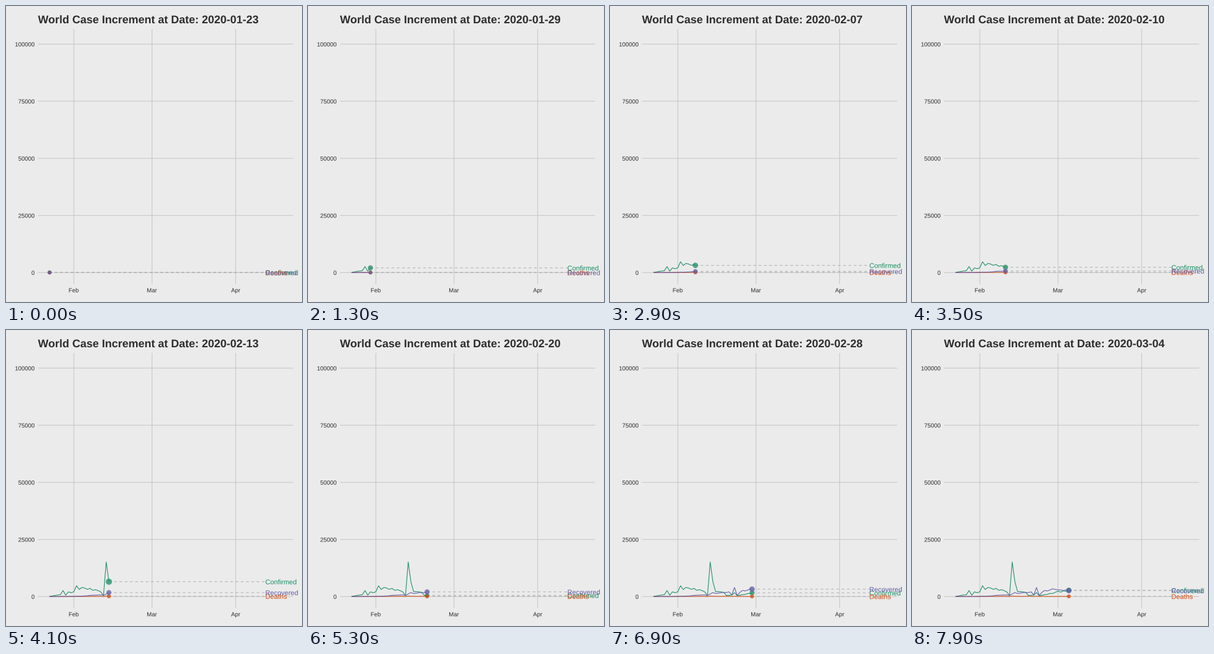
Recreate the animation shown at these times as a matplotlib script. Size 480 by 480 pixels, loop 8000 ms.

```python
import matplotlib.pyplot as plt
import numpy as np
from matplotlib.animation import FuncAnimation
from matplotlib.patches import Circle, PathPatch
from matplotlib.textpath import TextPath
from matplotlib.transforms import Affine2D

SIZE, DPI = 480, 100
PX = 72 / DPI
FRAMES, INTERVAL = 80, 100
START = np.datetime64("2020-01-23")
SPAN, STEPS = 86, 162  # days and steps of the complete reveal
LEFT, RIGHT, TOP, BOTTOM = 51.83, 465.6, 37.3, 451.1
BG, GRID, INK, DASH = "#ebebeb", "#c7c7c7", "#2d2d2d", "#b2b2b2"
LINE = 1.07 * PX

# Daily new cases: name -> (colour, values)
SERIES = {
    "Confirmed": ("#1b8e65", [
        98, 287, 493, 684, 809, 2651, 589, 2068, 1692, 2111, 4749, 3094, 4011, 3743,
        3159, 3597, 2731, 3030, 2612, 2040, 419, 15153, 6517, 2145, 2183, 2034, 1878,
        503, 558, 622, 1753, 386, 607, 846, 982, 1361, 1366, 1900, 2359, 1940, 2534,
        2280, 2766]),
    "Deaths": ("#d04c14", [
        1, 8, 16, 14, 26, 49, 2, 38, 42, 46, 103, 64, 66, 72, 70, 85, 87, 100, 107,
        100, 5, 253, 152, 143, 104, 98, 139, 115, 125, 4, 207, 11, 160, 79, 62, 44,
        58, 69, 55, 89, 75, 94, 94]),
    "Recovered": ("#625ca6", [
        2, 6, 3, 13, 9, 46, 19, 17, 79, 62, 188, 151, 229, 272, 363, 524, 605, 628,
        702, 737, 467, 1145, 1763, 1337, 1470, 1718, 1769, 1769, 2056, 713, 3996,
        508, 1833, 2678, 2479, 2893, 3434, 3071, 2934, 2886, 2626, 2942, 2626]),
}
DAYS = np.arange(43)
KEYS = np.round(DAYS * STEPS / SPAN)  # each day lands on a whole step


def px(day):
    return 70.64 + 4.3738 * np.asarray(day)


def py(value):
    return SIZE - 432.3 + 0.003705 * np.asarray(value)


def radius(value):
    return 3 + 8 * np.sqrt(value / 101600)


def text_path(s, x, y, size, weight="normal", align=0):
    """Outline of s with its baseline at (x, y); align 0 left, 0.5 centre, 1 right."""
    prop = {"family": "Liberation Sans", "weight": weight}
    path = TextPath((0, 0), s, size=size, prop=prop)
    if align:
        box = path.get_extents()
        x -= box.x0 + align * box.width
    return Affine2D().translate(x, y).transform_path(path)


def add_text(path, color, z=5):
    return ax.add_patch(PathPatch(path, fc=color, lw=0, zorder=z))


def title_path(day):
    s = f"World Case Increment at Date: {START + np.timedelta64(day, 'D')}"
    return text_path(s, LEFT, SIZE - 28, 18, "bold")


fig = plt.figure(figsize=(SIZE / DPI, SIZE / DPI), dpi=DPI, facecolor=BG)
ax = fig.add_axes([0, 0, 1, 1])
ax.set(xlim=(0, SIZE), ylim=(0, SIZE))
ax.axis("off")


def grid_line(xs, ys):
    ax.plot(xs, ys, color=GRID, lw=LINE, zorder=1, snap=False, solid_capstyle="butt")


for value in range(0, 100001, 25000):
    y = py(value)
    grid_line([LEFT, RIGHT], [y, y])
    add_text(text_path(str(value), 46.1, y - 3.7, 9.6, align=1), INK)
for day, month in ((9, "Feb"), (38, "Mar"), (69, "Apr")):
    x = px(day)
    grid_line([x, x], [SIZE - BOTTOM, SIZE - TOP])
    add_text(text_path(month, x, SIZE - 464.3, 9.6, align=0.5), INK)

title = add_text(title_path(0), INK)


class Trace:
    def __init__(self, name, color, values):
        self.values = np.array(values)
        self.line, = ax.plot([], [], color=color, lw=LINE, zorder=2,
                             solid_joinstyle="round", solid_capstyle="butt")
        self.dash, = ax.plot([], [], color=DASH, lw=LINE, zorder=3, snap=False,
                             linestyle=(0, (4, 4)))
        self.dot = ax.add_patch(Circle((0, 0), 3, fc=color, lw=0, alpha=0.75, zorder=4))
        self.label = add_text(text_path(name, px(80), -4.2, 11.04), color)

    def draw(self, i):
        day = np.interp(i, KEYS, DAYS)
        value = np.interp(i, KEYS, self.values)
        x, y = px(day), py(value)
        past = KEYS <= i
        self.line.set_data(np.append(px(DAYS[past]), x),
                           np.append(py(self.values[past]), y))
        self.dash.set_data([x, px(80)], [y, y])
        self.dot.set_center((x, y))
        self.dot.set_radius(radius(value))
        self.label.set_transform(Affine2D().translate(0, y) + ax.transData)


traces = [Trace(name, *spec) for name, spec in SERIES.items()]


def update(i):
    title.set_path(title_path(int(i * SPAN / STEPS)))
    for trace in traces:
        trace.draw(i)
    return []


anim = FuncAnimation(fig, update, frames=FRAMES, interval=INTERVAL,
                     repeat=True, repeat_delay=0)
plt.show()
```
